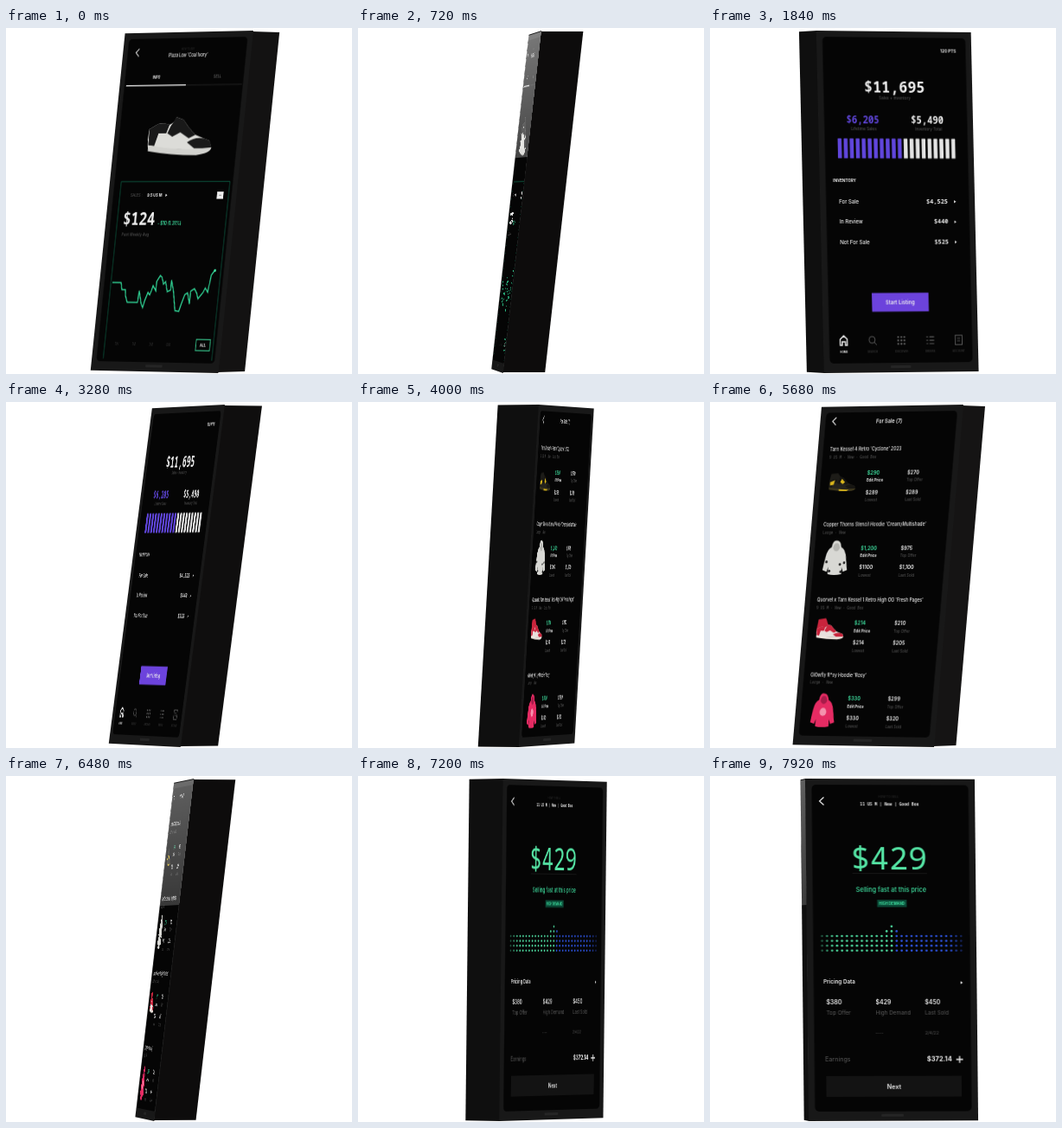
Write an HTML page that moves like this. It is 400 px wide and 400 px high and loops after 8 s.

```html
<!DOCTYPE html>
<html lang="en">
<head>
<meta charset="utf-8">
<style>
html, body { margin: 0; width: 100%; height: 100%; overflow: hidden; background: #fff; }
.side { position: absolute; backface-visibility: hidden; overflow: hidden; }
#face { left: 108.5px; top: 3.5px; width: 196px; height: 394px; background: #181818; outline: .8px solid #181818; }
.edge { left: 182px; top: 3.5px; width: 49px; height: 394px; }
#left { background: #0f0f0f; outline: .8px solid #0f0f0f; }
.gloss { position: absolute; left: 0; top: 0; width: 100%; height: 145px;
  background: linear-gradient(rgba(255,255,255,.46), rgba(255,255,255,.26)); }
svg { display: block; }
text { font-family: Inter, sans-serif; }
.mono { font-family: "Noto Sans Mono", monospace; }
</style>
</head>
<body>
<div class="side edge" id="left"><div class="gloss"></div></div>
<div class="side edge" id="right"></div>
<div class="side" id="face">
  <svg id="art" width="196" height="394" viewBox="0 0 196 394"></svg>
  <div class="gloss"></div>
</div>
<script>
const W = 196, D = 49, H = 394, DEPTH = 8000;
const WHITE = '#eee', GRAY = '#5a5a5a', DIM = '#303030', GREEN = '#3fe0a0', PURPLE = '#6046dc';
const $ = id => document.getElementById(id);

// --- drawing helpers ---
const text = (x, y, s, size, fill = WHITE, { a = 'start', w = 400, mono = false } = {}) =>
  `<text x="${x}" y="${y}" font-size="${size}" fill="${fill}" text-anchor="${a}" font-weight="${w}"${mono ? ' class="mono"' : ''}>${s}</text>`;
const mid = (x, y, s, size, fill, w = 400, mono = false) => text(x, y, s, size, fill, { a: 'middle', w, mono });
const rect = (x, y, w, h, fill, extra = '') =>
  `<rect x="${x}" y="${y}" width="${w}" height="${h}" fill="${fill}" ${extra}/>`;
const line = (d, stroke, width = 1) =>
  `<path d="${d}" fill="none" stroke="${stroke}" stroke-width="${width}"/>`;
const fill = (d, color) => `<path d="${d}" fill="${color}"/>`;
const dot = (x, y, r, color, o = 1) => `<circle cx="${x}" cy="${y}" r="${r}" fill="${color}" opacity="${o}"/>`;
const place = (x, y, k, s) => `<g transform="translate(${x} ${y}) scale(${k})">${s}</g>`;
const inset = s => place(W / 2 * .012, H / 2 * .012, .988, s);
const back = (x, y) => line(`M${x + 2.5} ${y - 4.5}l-5 4.5l5 4.5`, WHITE, 1.2);
const next = (x, y) => fill(`M${x} ${y - 1.7}l2.6 1.7l-2.6 1.7z`, WHITE);

const shoe = (base, patch, sole) =>
  fill('M3 15Q1 28 4 37L99 41Q104 34 98 29Q88 26 76 22Q66 15 55 4L44 1Q41 8 34 10Q24 7 16 9Z', base) +
  fill('M3 15L16 9Q26 7 34 10L30 20L18 20L13 35L4 34Z', patch) +
  fill('M44 1L55 4Q66 15 76 22L66 26L52 19L40 24L32 20L36 12Z', patch) +
  fill('M64 31Q80 22 98 29Q103 33 101 38L76 38Z', patch) +
  fill('M3 34L4 41Q40 46 80 46Q102 44 103 37Q60 42 3 34Z', sole);
const hoodie = (color, shade, spots) =>
  fill('M11 8Q12 -1 18 0Q24 0 25 8Q31 10 33 20L36 36L30 38L28 32V41Q17 43 8 41V32L6 38L0 36L3 20Q5 10 11 8Z', color) +
  fill('M13 9Q14 3 18 3Q22 3 23 9Q21 13 18 13Q15 13 13 9Z', shade) + spots;

// --- the four screens ---
function product() {
  const chart = 'M18 292.6H32L34.4 301H40L41 308L44.7 316H61L62 302L66.8 317L70 322L72 314L76 304L79 307' +
    'L81 302L83 296L88 302V291L92.7 284L95.7 286L99 294L102 291L106 303L111 301V289L115.7 302L121 325L127 326' +
    'L130 317L134 306L138 304L142.5 317V302L148 299L152 304L155 311L162 303L164.6 298L169 303L172 283L176 278';
  return back(21, 20) + mid(100, 18, 'HOW TO BUY', 3.2, DIM) +
    mid(101, 25.5, "Plaza Low 'Coal Ivory'", 5.8, WHITE, 500) +
    mid(55, 51.2, 'INFO', 5, WHITE, 700) + mid(150, 51.2, 'SELL', 5, GRAY, 600) +
    rect(8, 59, 181, .6, '#333') + rect(8, 58.5, 94, 1.3, WHITE) +
    place(49, 96, 1, shoe('#dcdcd8', '#191919', '#d2d2ce')) +
    line('M16 383V173H186V383', '#0d5c43', .9) +
    text(33, 191, 'SALES :', 5, GRAY) + text(59, 191, '9.5 US M', 5.4, WHITE, { w: 700 }) + next(88, 189.2) +
    rect(168, 185, 10, 8.5, WHITE) + line('M171 189.2h4', '#777', .8) +
    text(25, 224.6, '$124', 21, WHITE, { w: 600, mono: true }) +
    text(80, 224, '- $10 (1.31%)', 5.9, GREEN, { w: 700 }) +
    text(25, 237, 'Past Weekly Avg', 5.5, GRAY) +
    line(chart, '#2fcf92', 1.6) + dot(177, 277.5, 1.8, GREEN) +
    ['1W', '1M', '3M', '6M'].map((s, i) => mid(35 + 27 * i, 367, s, 4.2, DIM)).join('') +
    rect(159, 358.5, 22, 13, 'none', `stroke="${GREEN}" stroke-width="1"`) + mid(170, 366.8, 'ALL', 5, WHITE, 700);
}

function home() {
  let s = text(178, 20.5, '120 PTS', 5.2, WHITE, { a: 'end', w: 700 }) +
    mid(97, 68, '$11,695', 18.8, WHITE, 600, true) + mid(97, 76.8, 'Sales + Inventory', 5, GRAY) +
    mid(55, 105, '$6,205', 11.8, PURPLE, 600, true) + mid(138.5, 105, '$5,490', 11.8, WHITE, 600, true) +
    mid(56, 113.3, 'Lifetime Sales', 5, GRAY) + mid(140, 113.3, 'Inventory Total', 5, GRAY);
  for (let i = 0; i < 20; i++) s += rect(22 + 7.75 * i, 122.5, 5, 23.5, i < 11 ? PURPLE : '#e4e4e4', 'rx=".6"');
  s += text(15, 173.5, 'INVENTORY', 5, WHITE, { w: 700 });
  [['For Sale', '$4,525'], ['In Review', '$440'], ['Not For Sale', '$525']].forEach(([name, sum], i) => {
    const y = 199 + 23.8 * i;
    s += text(22, y, name, 6.6, WHITE, { w: 500 }) +
      text(163, y, sum, 7.8, WHITE, { a: 'end', w: 600, mono: true }) + next(171, y - 2.2);
  });
  s += rect(61.5, 304, 73.5, 22, '#6c43dc') + mid(98, 317.4, 'Start Listing', 6.5, WHITE, 600);
  ['HOME', 'SEARCH', 'DISCOVER', 'ORDERS', 'ACCOUNT'].forEach((name, i) =>
    s += mid(24 + 37.2 * i, 374, name, 3.2, i ? DIM : WHITE, 700));
  s += line('M19.5 365V358L24 354L28.5 358V365H26V361H22V365Z', WHITE, 1.5) +
    `<circle cx="60.5" cy="359" r="4" fill="none" stroke="${GRAY}"/>` + line('M63.5 362l3 3', GRAY);
  for (let i = 0; i < 9; i++) s += dot(94.4 + i % 3 * 4, 356 + (i / 3 | 0) * 4, 1.2, GRAY);
  for (let i = 0; i < 3; i++) s += line(`M131 ${356 + 4 * i}h2m2 0h6`, GRAY, 1.2);
  return s + rect(168.5, 354.5, 9, 11, 'none', `stroke="${GRAY}"`) + line('M171 358h4m-4 3h4', GRAY, .9);
}

function listing() {
  const spots = [[5, 26], [31, 27], [25, 29], [10, 37], [27, 38]].map(p => dot(...p, 1.7, '#222')).join('');
  const items = [
    ["Tarn Kessel 4 Retro 'Cyclone' 2023", '9 US M · New · Good Box', ['$290', '$270', '$289', '$289'],
      place(17, 32, .38, fill('M3 15L9 -8L34 -10L44 1L34 14Z', '#1d1c18') + shoe('#24231e', '#171612', '#3b351c') +
        fill('M6 18L24 12L20 26L7 28ZM50 8L62 18L54 24L44 18ZM40 40L78 42L70 46L42 45Z', '#dcb81c'))],
    ["Copper Thorns Stencil Hoodie 'Cream/Multishade'", 'Large · New', ['$1,200', '$975', '$1100', '$1,100'],
      place(19, 19, .97, hoodie('#d8d8d4', '#b4b4b0', spots))],
    ["Quorvel x Tarn Kessel 1 Retro High OG 'Fresh Pages'", '9 US M · New · Good Box', ['$214', '$210', '$214', '$205'],
      place(17, 29, .39, fill('M3 15L7 -14L34 -18L44 1L34 14Z', '#c9243c') + shoe('#e7dfdc', '#c9243c', '#eee6df'))],
    ["Gl0wfly R*sy Hoodie 'Rosy'", 'Large · New', ['$330', '$299', '$330', '$320'],
      place(20, 22, .95, hoodie('#e52b63', '#a81c4a', dot(18, 23, 5, '#f492ad')))]
  ];
  return back(18, 14) + mid(96, 16.5, 'For Sale (7)', 6.8, WHITE, 600) +
    items.map(([name, note, p, art], i) => place(0, 47.4 + 88.9 * i, 1,
      text(15, 2, name, 6.05, WHITE, { w: 500 }) + text(15, 10.8, note, 4.9, GRAY, { mono: true }) + art +
      [[71, 30, GREEN], [127.5, 30, WHITE], [71, 53, WHITE], [127.5, 53, WHITE]].map(([x, y, c], j) =>
        text(x, y, p[j], 6.9, c, { w: 600 }) +
        text(x, y + 8.6, ['Edit Price', 'Top Offer', 'Lowest', 'Last Sold'][j], 5.1, j ? GRAY : WHITE, { w: j ? 400 : 700 })
      ).join(''))).join('');
}

function pricing() {
  let s = back(18, 25) + mid(96, 21, 'HOW TO SELL', 3.5, DIM) +
    mid(97, 30, '11 US M | New | Good Box', 4.8, WHITE, 600, true) +
    mid(96, 104, '$429', 37, '#55e5a5', 500, true) + rect(53, 108, 87, .6, '#222') +
    mid(98, 130.5, 'Selling fast at this price', 7.4, GREEN, 500) +
    rect(81.5, 139, 34.5, 8.5, '#0a4735') + mid(98.7, 144.9, 'HIGH DEMAND', 4.2, GREEN, 700);
  for (let c = -14; c <= 14; c++) {
    const top = c ? (Math.abs(c) === 1 ? -1 : 0) : -2;
    for (let r = top; r < 4; r++)
      s += dot(98 + c * 5.8, 181 + r * 5.6, 1.35, c < 1 ? '#4bd39a' : '#2c50d6', Math.min(1, (15.5 - Math.abs(c)) / 4));
  }
  s += text(18, 236.5, 'Pricing Data', 6.3, WHITE, { w: 600 }) + next(178, 235);
  [['$380', 'Top Offer'], ['$429', 'High Demand'], ['$450', 'Last Sold']].forEach(([sum, name], i) =>
    s += text(21 + 57.5 * i, 260.3, sum, 7, WHITE, { w: 600 }) + text(21 + 57.5 * i, 272.3, name, 6.4, GRAY));
  return s + text(78, 295, '----', 5, GRAY) + text(136, 295, '2/4/22', 5, GRAY) +
    text(19, 326.5, 'Earnings', 7.2, GRAY) + text(167, 326.5, '$372.14', 7.6, WHITE, { a: 'end', w: 700 }) +
    line('M172 324h8m-4 -4v8', WHITE, 1.3) +
    rect(20, 343, 158, 24, '#131313') + mid(99, 357.6, 'Next', 7.3, WHITE, 600);
}

const screens = [inset(product()), inset(home()), inset(listing()), pricing()];
$('art').innerHTML = rect(6.5, 6, 183, 378, '#050505', 'rx="5"') + rect(84, 387, 26, 3, '#252525', 'rx="1"') +
  screens.map(s => `<g class="screen">${s}</g>`).join('');
const groups = document.querySelectorAll('.screen');
const [leftGloss, faceGloss] = document.querySelectorAll('.gloss');

const sheen = tilt => tilt < 0 ? 0 : Math.max(0, Math.min(1, (.25 - tilt) * 6));

function show(ms) {
  const turn = 41 + ms * 180 / 2900;
  const index = Math.floor((turn + 90) / 180);
  const angle = turn - index * 180, rad = angle * Math.PI / 180;
  const sin = Math.sin(rad), cos = Math.cos(rad);
  const lean = 21 + 30 * Math.cos(2 * (rad - 66 * Math.PI / 180));
  const size = 1 - (W / 2 * Math.abs(sin) + D / 2 * cos) / DEPTH;  // nearest edge keeps its height
  const pose = `matrix(1,0,${-lean / H},1,0,0) scale(${size}) perspective(${DEPTH}px) rotateY(${-angle}deg) `;
  $('face').style.transform = pose + `translateZ(${D / 2}px)`;
  $('left').style.transform = pose + `rotateY(-90deg) translateZ(${W / 2}px)`;
  $('right').style.transform = pose + `rotateY(90deg) translateZ(${W / 2}px)`;
  const tone = 31 - 18 * Math.abs(sin);
  $('right').style.background = `rgb(${tone},${tone - 1},${tone - 1})`;
  faceGloss.style.opacity = sin > 0 ? sheen(cos) : 0;
  leftGloss.style.opacity = sheen(-sin);
  groups.forEach((g, i) => g.style.display = i === index ? '' : 'none');
}

function tick() {
  show(Math.floor(performance.now() % 8000 / 80) * 80);
  requestAnimationFrame(tick);
}
tick();
</script>
</body>
</html>
```
